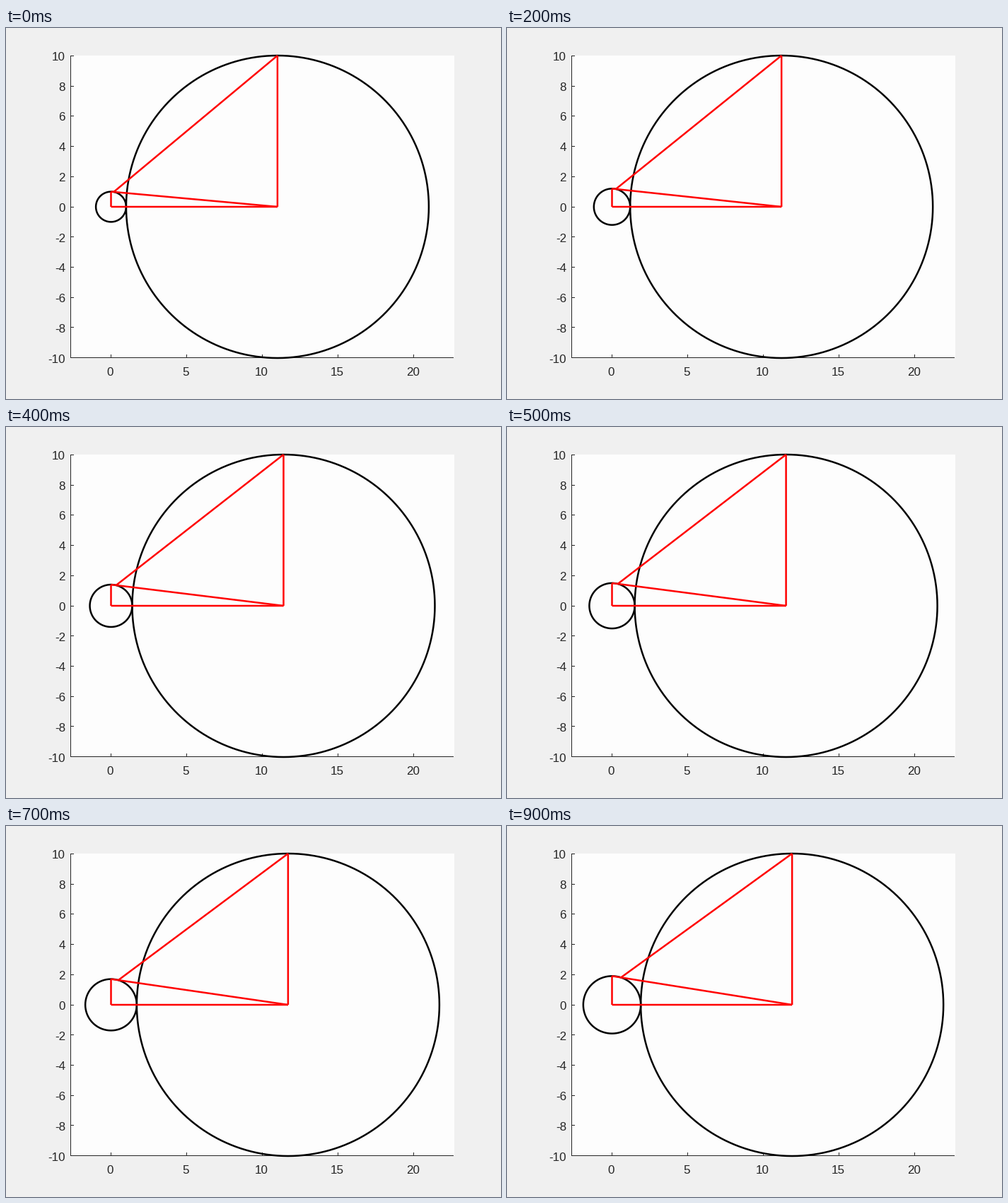
Write a matplotlib script that moves like this. It is 700x525 px and loops after 1000 ms.

```python
import numpy as np
import matplotlib.pyplot as plt
from matplotlib.animation import FuncAnimation
from matplotlib.patches import Rectangle

W, H, DPI = 700, 525, 100
PT = 72 / DPI                      # points per pixel
SCALE, X0, Y0 = 21.4, 148.5, 253   # pixels per unit, origin on the stage
BIG = 10
INK = "#262626"
FRAMES = 10

plt.rcParams["font.family"] = "Liberation Sans"
fig = plt.figure(figsize=(W / DPI, H / DPI), dpi=DPI, facecolor="#f0f0f0")
ax = fig.add_axes([0, 0, 1, 1])
ax.set(xlim=(0, W), ylim=(H, 0))
ax.axis("off")


def to_px(x, y):
    return X0 + SCALE * np.asarray(x), Y0 - SCALE * np.asarray(y)


def rule(xs, ys):
    ax.plot(xs, ys, color=INK, lw=PT, snap=False, solid_capstyle="butt", zorder=2)


def label(x, y, value, align):
    ax.text(x, y, str(value), color=INK, fontsize=17 * PT, ha=align, va="baseline")


def pixel_center(v):
    return np.floor(v) + 0.5


def draw_axes():
    left, right, top, bottom = 91.5, 633.5, 39.5, 466.5
    ax.add_patch(Rectangle((91, 39), 543, 428, fc="#fdfdfd", lw=0, snap=False, zorder=1))
    rule([left, left], [39, 467])
    rule([91, 633], [bottom, bottom])
    for value in range(0, 21, 5):
        x = pixel_center(X0 + SCALE * value)
        rule([x, x], [467, 462])
        label(x - 1, 492, value, "center")
    for value, y in zip(range(-10, 11, 2), np.linspace(bottom, top, 11)):
        y = pixel_center(y)
        rule([91, 96], [y, y])
        label(84, Y0 - SCALE * value + 6.8, value, "right")


def stroke(color, z):
    return ax.plot([], [], color=color, lw=2.5 * PT, snap=False, zorder=z,
                   solid_joinstyle="round", solid_capstyle="butt")[0]


draw_axes()
small, large = stroke("black", 3), stroke("black", 3)
wires = [stroke("red", 4) for _ in range(5)]
angle = np.linspace(0, 2 * np.pi, 361)


def circle(line, cx, radius):
    line.set_data(*to_px(cx + radius * np.cos(angle), radius * np.sin(angle)))


def update(i):
    r = 1 + 0.1 * i
    c = BIG + r
    circle(small, 0, r)
    circle(large, c, BIG)
    # second crossing of the line (0, r)-(c, 0) with the small circle
    t = 2 * r * r / (c * c + r * r)
    points = [(c, 0), (0, 0), (0, r), (c, 0), (c, BIG), (c * t, r * (1 - t))]
    for wire, start, end in zip(wires, points, points[1:]):
        wire.set_data(*to_px(*zip(start, end)))
    return [small, large, *wires]


anim = FuncAnimation(fig, update, frames=FRAMES, interval=100, repeat=True,
                     repeat_delay=0)
plt.show()
```
